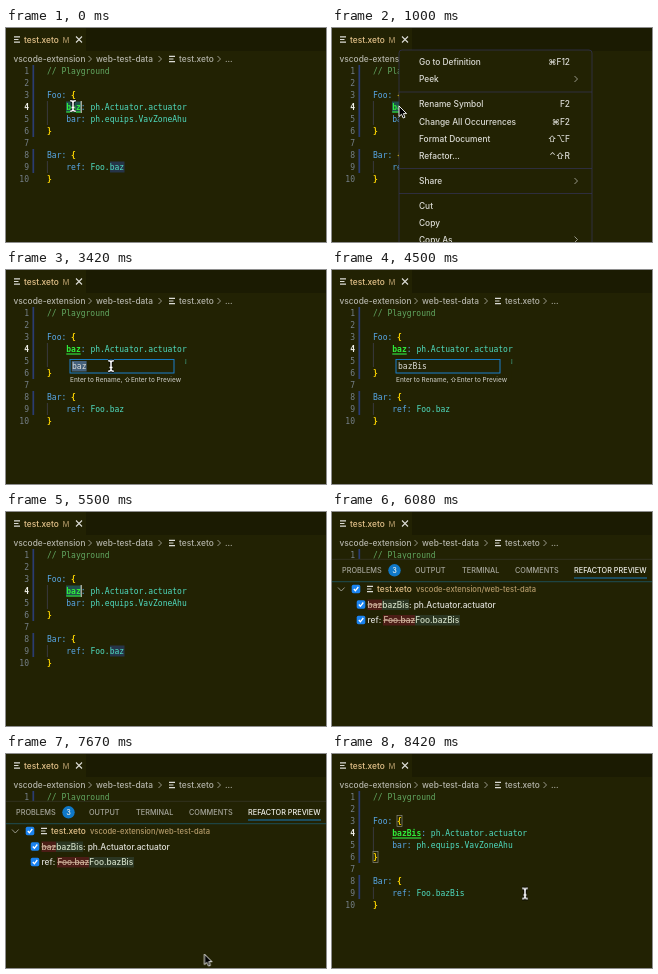
An HTML page for the animation above (8.51 s loop, 320x214 px).

```html
<!DOCTYPE html>
<html lang="en">
<head>
<meta charset="utf-8">
<title>Rename symbol with preview</title>
<style>
  :root { --bg: #222203; --loop: 8510ms; }
  html, body { margin: 0; width: 100%; height: 100%; overflow: hidden; background: var(--bg); }
  svg { display: block; width: 100vw; height: 100vh; }
  text { white-space: pre; font: 500 8.35px Inter, "DejaVu Sans", sans-serif; fill: #dcdcd6; }
  .code text, .mono { font: 8px "DejaVu Sans Mono", monospace; }
  .bg { fill: var(--bg); }
  .line { fill: none; stroke: #b4b4aa; stroke-width: .8; }
  .crumbs text { fill: #b4b4aa; }
  .modified { fill: #e6c48c; }
  .code .key { fill: #58a8e8; }
  .code .type { fill: #4fdcc0; }
  .code .brace { fill: #ffd700; font-weight: bold; }
  .code .comment { fill: #62a862; }
  .code .symbol { fill: #30ee3c; font-weight: bold; }
  .code .numbers text { fill: #76808a; text-anchor: end; }
  .code .numbers .active { fill: #f0f0ea; font-weight: bold; }
  .underline { stroke: #30dd3c; stroke-width: 1.2; }
  .end { text-anchor: end; }
  .rule { stroke: #34345a; stroke-width: .7; }
  .tabs text { font-size: 7.3px; fill: #a6a69c; }
  .tabs .current { fill: #f0f0ea; }
  .hint { font-size: 6.45px; fill: #bcbcb2; }
  .removed { text-decoration: line-through; fill: #d0b49c; }
  .added { fill: #d0dcc4; }

  /* Hard on/off switches */
  .timed { opacity: 0; animation: var(--loop) step-end infinite; }
  .before { animation-name: before; }
  .after { animation-name: after; }
  .selection { animation-name: selection; }
  .brackets { animation-name: brackets; }
  .menu { animation-name: menu; }
  .hover { animation-name: hover; }
  .popup { animation-name: popup; }
  .focus { animation-name: focus; }
  .marked { animation-name: marked; }
  .type-b { animation-name: type-b; }
  .type-i { animation-name: type-i; }
  .type-s { animation-name: type-s; }
  .panel { animation-name: panel; }
  .pointer { animation-name: pointer; }
  .beam { animation-name: beam; }
  .arrow { animation-name: arrow; }
  @keyframes before { 0% { opacity: 1 } 88%, to { opacity: 0 } }
  @keyframes after { 0% { opacity: 0 } 88%, to { opacity: 1 } }
  @keyframes selection { 0% { opacity: 1 } 22.5% { opacity: 0 } 58.8% { opacity: 1 } 88%, to { opacity: 0 } }
  @keyframes brackets { 0% { opacity: 0 } 93%, to { opacity: 1 } }
  @keyframes menu { 0% { opacity: 0 } 4.9% { opacity: 1 } 19.6%, to { opacity: 0 } }
  @keyframes hover { 0% { opacity: 0 } 14.6% { opacity: 1 } 19.6%, to { opacity: 0 } }
  @keyframes popup { 0% { opacity: 0 } 20.5% { opacity: 1 } 58.8%, to { opacity: 0 } }
  @keyframes focus { 0% { opacity: 0 } 22.5%, to { opacity: 1 } }
  @keyframes marked { 0% { opacity: 0 } 22.5% { opacity: 1 } 45%, to { opacity: 0 } }
  @keyframes type-b { 0% { opacity: 0 } 47%, to { opacity: 1 } }
  @keyframes type-i { 0% { opacity: 0 } 49%, to { opacity: 1 } }
  @keyframes type-s { 0% { opacity: 0 } 51%, to { opacity: 1 } }
  @keyframes panel { 0% { opacity: 0 } 68.5% { opacity: 1 } 91.1%, to { opacity: 0 } }
  @keyframes pointer { 0% { opacity: 1 } 45% { opacity: 0 } 87.2%, to { opacity: 1 } }
  @keyframes beam { 0% { opacity: 1 } 4.9% { opacity: 0 } 19.6% { opacity: 1 } 68.5% { opacity: 0 } 91.1%, to { opacity: 1 } }
  @keyframes arrow { 0% { opacity: 0 } 4.9% { opacity: 1 } 19.6% { opacity: 0 } 68.5% { opacity: 1 } 91.1%, to { opacity: 0 } }

  .travel { animation: travel var(--loop) ease-in-out infinite; }
  @keyframes travel {
    0%, 12.7% { transform: translate(67px, 78px) }
    17.6%, 22.5% { transform: translate(94px, 79.5px) }
    31.7%, 45% { transform: translate(105px, 96px) }
    87% { transform: translate(200px, 218px) }
    96.5%, to { transform: translate(193px, 139.5px) }
  }
</style>
</head>
<body>
<svg viewBox="0 0 320 214">
  <defs>
    <path id="file" class="line" d="M0-2.7H6M0 0H4.5M0 2.7H6" style="stroke:#dcdcd6;stroke-width:1.2"/>
    <path id="chevron" class="line" d="M-1.5-3L1.5 0L-1.5 3"/>
    <g id="check">
      <rect x="-4.3" y="-4.3" width="8.6" height="8.6" rx="1.7" fill="#1a83f0"/>
      <path d="M-2.2 0L-.6 1.8L2.3-2" fill="none" stroke="#fff" stroke-width="1.3"/>
    </g>
    <path id="ibeam" d="M-2.8-5.3Q0-5.3 0-3.6V3.6Q0 5.3-2.8 5.3M2.8-5.3Q0-5.3 0-3.6V3.6Q0 5.3 2.8 5.3M-1.5 1.5H1.5" fill="none"/>
  </defs>
  <rect class="bg" width="320" height="214"/>
  <rect x="80" width="240" height="23" fill="#1b1b02"/>

  <use href="#file" x="8" y="11.5"/>
  <text x="18" y="14.5" class="modified">test.xeto</text>
  <text x="56.5" y="14.5" class="modified" opacity=".65" style="font-size:7.6px">M</text>
  <path class="line" d="M70 8.5L76 14.5M76 8.5L70 14.5" style="stroke:#dcdcd6;stroke-width:1.1"/>

  <g class="crumbs">
    <text x="7.5" y="33.5">vscode-extension</text><use href="#chevron" x="84" y="31"/>
    <text x="90" y="33.5">web-test-data</text><use href="#chevron" x="154" y="31"/>
    <use href="#file" x="163" y="31"/>
    <text x="173" y="33.5">test.xeto</text><use href="#chevron" x="213" y="31"/>
    <text x="219" y="33.5">...</text>
  </g>

  <g class="code">
    <path d="M27.3 37V109M27.3 121V145" stroke="#2b3c72" stroke-width="1.7"/>
    <path d="M41.4 73V97M41.4 133V145" stroke="#45455a" stroke-width=".7"/>
    <g class="numbers">
      <text x="23" y="46">1</text><text x="23" y="58">2</text><text x="23" y="70">3</text>
      <text x="23" y="82" class="active">4</text><text x="23" y="94">5</text><text x="23" y="106">6</text>
      <text x="23" y="118">7</text><text x="23" y="130">8</text><text x="23" y="142">9</text><text x="23" y="154">10</text>
    </g>
    <g class="timed selection">
      <rect x="60" y="73.5" width="15" height="11" fill="#21504c"/>
      <rect x="104" y="133.5" width="14.5" height="11" fill="#263448"/>
      <path d="M75.2 73V85" stroke="#e4e4dc"/>
    </g>
    <g class="timed brackets" fill="none" stroke="#8a8a80" stroke-width=".7">
      <rect x="65" y="61.5" width="5" height="11"/><rect x="41" y="97.5" width="5" height="11"/>
    </g>
    <text x="41" y="46" class="comment">// Playground</text>
    <text x="41" y="70" class="key">Foo: <tspan class="brace">{</tspan></text>
    <text x="60.3" y="94" class="key">bar: <tspan class="type">ph.equips.VavZoneAhu</tspan></text>
    <text x="41" y="106" class="brace">}</text>
    <text x="41" y="130" class="key">Bar: <tspan class="brace">{</tspan></text>
    <text x="41" y="154" class="brace">}</text>
    <g class="timed before">
      <text x="60.3" y="82" class="key"><tspan class="symbol">baz</tspan>: <tspan class="type">ph.Actuator.actuator</tspan></text>
      <path class="underline" d="M60.3 84H74.7"/>
      <text x="60.3" y="142" class="key">ref: <tspan class="type">Foo.baz</tspan></text>
    </g>
    <g class="timed after">
      <text x="60.3" y="82" class="key"><tspan class="symbol">bazBis</tspan>: <tspan class="type">ph.Actuator.actuator</tspan></text>
      <path class="underline" d="M60.3 84H89.2"/>
      <text x="60.3" y="142" class="key">ref: <tspan class="type">Foo.bazBis</tspan></text>
    </g>
  </g>

  <g class="timed popup">
    <rect class="bg" x="60" y="86" width="119.5" height="29"/>
    <rect x="64" y="89.5" width="104" height="13.5" fill="none" stroke="#303028" stroke-width=".8"/>
    <g class="timed focus"><rect x="64" y="89.5" width="104" height="13.5" fill="none" stroke="#1683d0" stroke-width=".9"/></g>
    <rect class="timed marked" x="65.8" y="91" width="14.8" height="10.5" fill="#45617c"/>
    <text class="mono" x="66" y="99">baz</text>
    <text class="mono timed type-b" x="80.45" y="99">B</text>
    <text class="mono timed type-i" x="85.26" y="99">i</text>
    <text class="mono timed type-s" x="90.08" y="99">s</text>
    <text class="hint" x="64" y="112">Enter to Rename, ⇧Enter to Preview</text>
  </g>

  <g class="timed menu">
    <rect class="bg" x="67" y="22" width="193" height="200" rx="3" stroke="#34345a" stroke-width=".7"/>
    <rect class="timed hover" x="70" y="67.7" width="187" height="17" rx="2.5" fill="#0b6cc0"/>
    <path class="rule" d="M67 64H260M67 140.5H260M67 165.5H260"/>
    <text x="87" y="37">Go to Definition</text><text class="end" x="238" y="37">⌘F12</text>
    <text x="87" y="54">Peek</text><use href="#chevron" x="244" y="51"/>
    <text x="87" y="79">Rename Symbol</text><text class="end" x="238" y="79">F2</text>
    <text x="87" y="96.5">Change All Occurrences</text><text class="end" x="238" y="96.5">⌘F2</text>
    <text x="87" y="114">Format Document</text><text class="end" x="238" y="114">⇧⌥F</text>
    <text x="87" y="131">Refactor...</text><text class="end" x="238" y="131">⌃⇧R</text>
    <text x="87" y="156">Share</text><use href="#chevron" x="244" y="153"/>
    <text x="87" y="180.5">Cut</text>
    <text x="87" y="197.5">Copy</text>
    <text x="87" y="214.5">Copy As</text><use href="#chevron" x="244" y="211.5"/>
  </g>

  <g class="timed panel">
    <rect class="bg" y="47" width="320" height="167"/>
    <path d="M0 47.3H320" stroke="#38382c" stroke-width=".7"/>
    <g class="tabs">
      <text x="10" y="61">PROBLEMS</text>
      <circle cx="62.5" cy="58.3" r="6.2" fill="#0f78c8"/>
      <text x="62.5" y="61" text-anchor="middle" class="current">3</text>
      <text x="83" y="61">OUTPUT</text>
      <text x="130" y="61">TERMINAL</text>
      <text x="183" y="61">COMMENTS</text>
      <text x="242" y="61" class="current">REFACTOR PREVIEW</text>
      <path d="M242 66H315" stroke="#1683d0" stroke-width=".9"/>
    </g>
    <path d="M0 69.7H320" stroke="#1d5868" stroke-width=".8"/>
    <path class="line" d="M6 75.5L9.3 79L12.6 75.5"/>
    <use href="#check" x="24" y="77"/>
    <use href="#file" x="35" y="77"/>
    <text x="45" y="80" class="modified">test.xeto</text>
    <text x="84" y="80" class="modified" opacity=".75" style="font-size:7.6px">vscode-extension/web-test-data</text>
    <rect x="35.5" y="87.5" width="14.5" height="10.5" fill="#4b1d16"/>
    <rect x="51" y="103" width="32" height="10.5" fill="#4b1d16"/>
    <path d="M50 87.5H77V98H50zM83 103H128V113.5H83z" fill="#2b3622"/>
    <use href="#check" x="29" y="92.5"/>
    <text x="35.5" y="95.5"><tspan class="removed">baz</tspan><tspan class="added">bazBis</tspan>: ph.Actuator.actuator</text>
    <use href="#check" x="29" y="108"/>
    <text x="35.5" y="111">ref: <tspan class="removed">Foo.baz</tspan><tspan class="added">Foo.bazBis</tspan></text>
  </g>

  <g class="timed pointer">
    <g class="travel">
      <g class="timed beam">
        <use href="#ibeam" stroke="#000" stroke-width="3"/>
        <use href="#ibeam" stroke="#fff" stroke-width="1.5"/>
      </g>
      <path class="timed arrow" d="M0 0V10.5L2.5 8.3L4.2 12L6 11.2L4.4 7.6H7.6Z" fill="#000" stroke="#fff" stroke-width=".9"/>
    </g>
  </g>
</svg>
</body>
</html>
```
